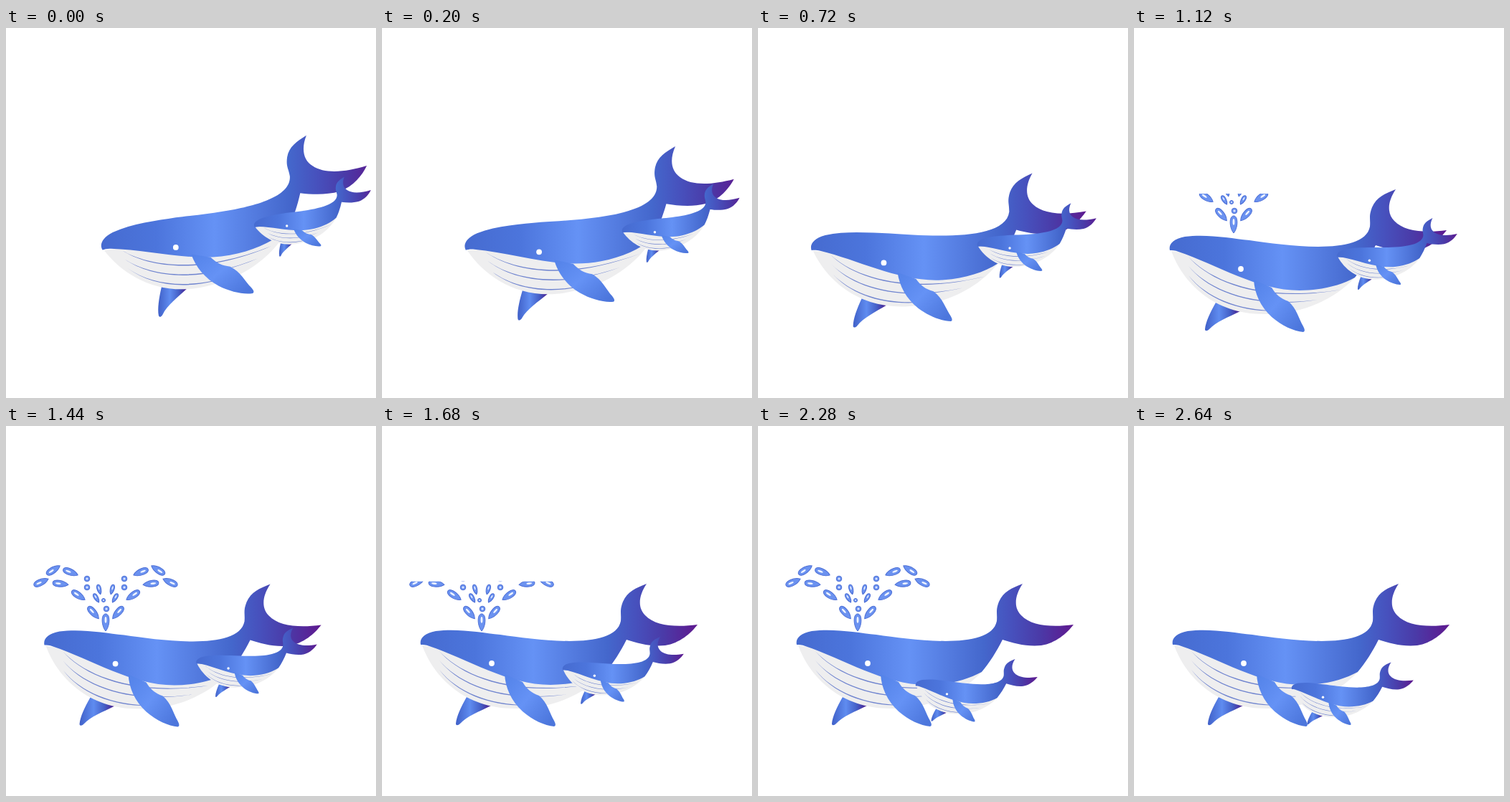
These frames come from a looping animation (516 by 516 pixels, 2.68 s). An HTML page:

```html
<!DOCTYPE html>
<html lang="en">
<head>
<meta charset="utf-8">
<title>Whale and calf</title>
<style>
html, body { margin: 0; width: 100%; height: 100%; overflow: hidden; background: #fff; }
svg { display: block; width: 100%; height: 100%; }
</style>
</head>
<body>
<svg id="stage" viewBox="0 0 516 516"></svg>
<script>
const LOOP = 2680, STEP = 40;
const HEAD = { x: 53, y: 303 };
const SPOUT = { x: 139, y: 287, height: 95 };
const stage = document.getElementById('stage');

function add(parent, tag, attrs = {}) {
  const node = document.createElementNS('http://www.w3.org/2000/svg', tag);
  set(node, attrs);
  parent.appendChild(node);
  return node;
}
function set(node, attrs) {
  for (const key in attrs) node.setAttribute(key, attrs[key]);
}
const mix = (a, b, p) => a + (b - a) * p;
const clamp = v => Math.max(0, Math.min(1, v));
const deg = a => a * 180 / Math.PI;

// Turn a point about the head; the tail turns a little less than the jaw.
function bend(px, py, p) {
  const x = px - HEAD.x, y = py - HEAD.y, r = Math.hypot(x, y);
  const a = Math.atan2(y, x) - (1 - p) * (18 - r * .0115) * Math.PI / 180;
  return [r * Math.cos(a), r * Math.sin(a)];
}
const bendPath = (d, p) => d.replace(/([\d.]+) ([\d.]+)/g,
  (_, x, y) => bend(+x, +y, p).map(v => v.toFixed(2)).join(' '));

// Tapered throat line: one curve out, a slightly lower one back
function groove(k) {
  const from = `80 ${314 + 13 * k}`, to = `${292 - 32 * k} ${360 + 14 * k}`;
  const c1 = dy => `108 ${345 + 15 * k + dy}`;
  const c2 = dy => `${178 - 8 * k} ${378 + 8 * k + dy}`;
  return `M${from} C${c1(0)} ${c2(0)} ${to} C${c2(2)} ${c1(2)} ${from}Z`;
}

const PARTS = [
  ['url(#rear)', 'M118 378 C110 392 104 405 103 415 C103 418 106 418 109 415 C118 405 136 398 152 390Z'],
  ['#eeeeef', 'M56 306 C72 350 115 394 185 394 C240 395 285 372 312 343Z'],
  ...[0, 1, 2].map(k => ['#6f84cf', groove(k)]),
  ['url(#skin)',
    'M54 305 C52 297 58 289 75 286 C105 282 138 288 165 291 C220 299 325 313 333 272 ' +
    'C334 260 331 258 336 245 C342 231 354 226 369 220 C357 238 357 254 367 264 ' +
    'C381 279 410 281 440 277 C431 289 415 303 395 306 C375 308 356 303 341 298 ' +
    'C333 314 323 330 312 343 C292 354 265 361 235 361 C175 361 120 325 66 307 C61 305 57 305 54 305Z'],
  ['url(#fin)',
    'M171 346 C172 365 180 383 196 398 C210 410 227 418 240 419 C243 418 242 415 240 411 ' +
    'C234 401 231 386 219 376 C208 372 202 367 196 357Z']
];

const defs = add(stage, 'defs');
function gradient(id, attrs, stops) {
  const g = add(defs, 'linearGradient', { id, ...attrs });
  stops.forEach(([offset, color]) => add(g, 'stop', { offset, 'stop-color': color }));
}
gradient('fin', { x2: 1, y2: .8 }, [[0, '#5382e8'], [.5, '#6592f5'], [1, '#4c76dc']]);
gradient('rear', {}, [[0, '#4060c8'], [.4, '#5f8cf0'], [.7, '#4561c8'], [1, '#4a1a8c']]);
gradient('skin', { gradientUnits: 'userSpaceOnUse', x1: 0, x2: 385 }, [
  [0, '#466bd0'], [.2, '#4c75dc'], [.41, '#6592f5'], [.68, '#4467cc'],
  [.78, '#4751bd'], [.88, '#4a3ba8'], [1, '#5e1a90']]);

function makeWhale(scale) {
  const root = add(stage, 'g');
  const paths = PARTS.map(([fill]) => add(root, 'path', { fill }));
  const eye = add(root, 'circle', { r: 3.9, fill: '#fff' });
  return (x, y, p) => {
    paths.forEach((path, i) => path.setAttribute('d', bendPath(PARTS[i][1], p)));
    const [cx, cy] = bend(153, 331, p);
    set(eye, { cx, cy });
    set(root, { transform: `translate(${x} ${y}) scale(${scale})` });
  };
}

// Spout parts are placed by distance and height from the blowhole.
const clip = add(add(defs, 'clipPath', { id: 'rise' }), 'rect', { width: 516 });
const spout = add(stage, 'g', { 'clip-path': 'url(#rise)', stroke: '#4d6fd6', fill: '#6b92f0' });

function drop(d, h, len, turn) {
  const g = add(spout, 'g', {
    transform: `translate(${SPOUT.x + d} ${SPOUT.y - h}) rotate(${-turn}) scale(${len})`,
    'stroke-width': 1 / len
  });
  add(g, 'path', { d: 'M-.5 0 C-.2 -.26 .5 -.28 .5 0 C.5 .28 -.2 .26 -.5 0Z' });
  add(g, 'ellipse', { cx: .15, rx: .18, ry: .06, fill: '#eef3ff', stroke: 'none' });
}
function bead(d, h, r) {
  const cx = SPOUT.x + d, cy = SPOUT.y - h;
  add(spout, 'circle', { cx, cy, r });
  add(spout, 'circle', { cx, cy, r: r * .4, fill: '#dfe8ff', stroke: 'none' });
}
function pair(d, h, len, turn) {
  drop(d, h, len, turn);
  drop(-d, h, len, 180 - turn);
}
// Jets follow h = a·d − b·d²
function jet(a, b, distances) {
  for (const d of distances)
    pair(d, a * d - b * d * d, 22, deg(Math.atan(a - 2 * b * d - .25)));
}
jet(1.75, .0109, [17, 38, 63, 90]);
jet(2.75, .0215, [49, 73]);
drop(0, 13, 24, 90);
for (const [d, h] of [[9, 59], [13, 47]]) pair(d, h, 14, deg(Math.atan2(h - 25, d)));
for (const side of [-1, 1]) [62, 74].forEach(h => bead(side * 26, h, 3.8));
bead(1, 32, 3.8);
bead(-3, 44, 2.5);

const mother = makeWhale(1);
const calf = makeWhale(.44);

function spoutLevel(t) {
  const burst = (from, to) => Math.min(clamp((t - from) / 200), clamp((to - t) / 160));
  return SPOUT.height * Math.max(burst(1000, 1800), burst(1940, 2600));
}

function draw(t) {
  const dive = 1 - (1 - clamp(t / 1120)) ** 1.2;
  const settle = clamp((t - 1120) / 360);
  mother(133 - 84 * dive + 4 * settle, 308 - 5 * settle, dive);

  const swim = clamp(t / 2250);
  calf(mix(346, 219.5, swim), mix(277, 366, clamp(t / 2400)), swim);

  const height = spoutLevel(t);
  set(clip, { y: SPOUT.y + 1 - height, height });
}

let start;
function tick(now) {
  start ??= now;
  draw(Math.floor(((now - start) % LOOP) / STEP) * STEP);
  requestAnimationFrame(tick);
}
draw(0);
requestAnimationFrame(tick);
</script>
</body>
</html>
```
